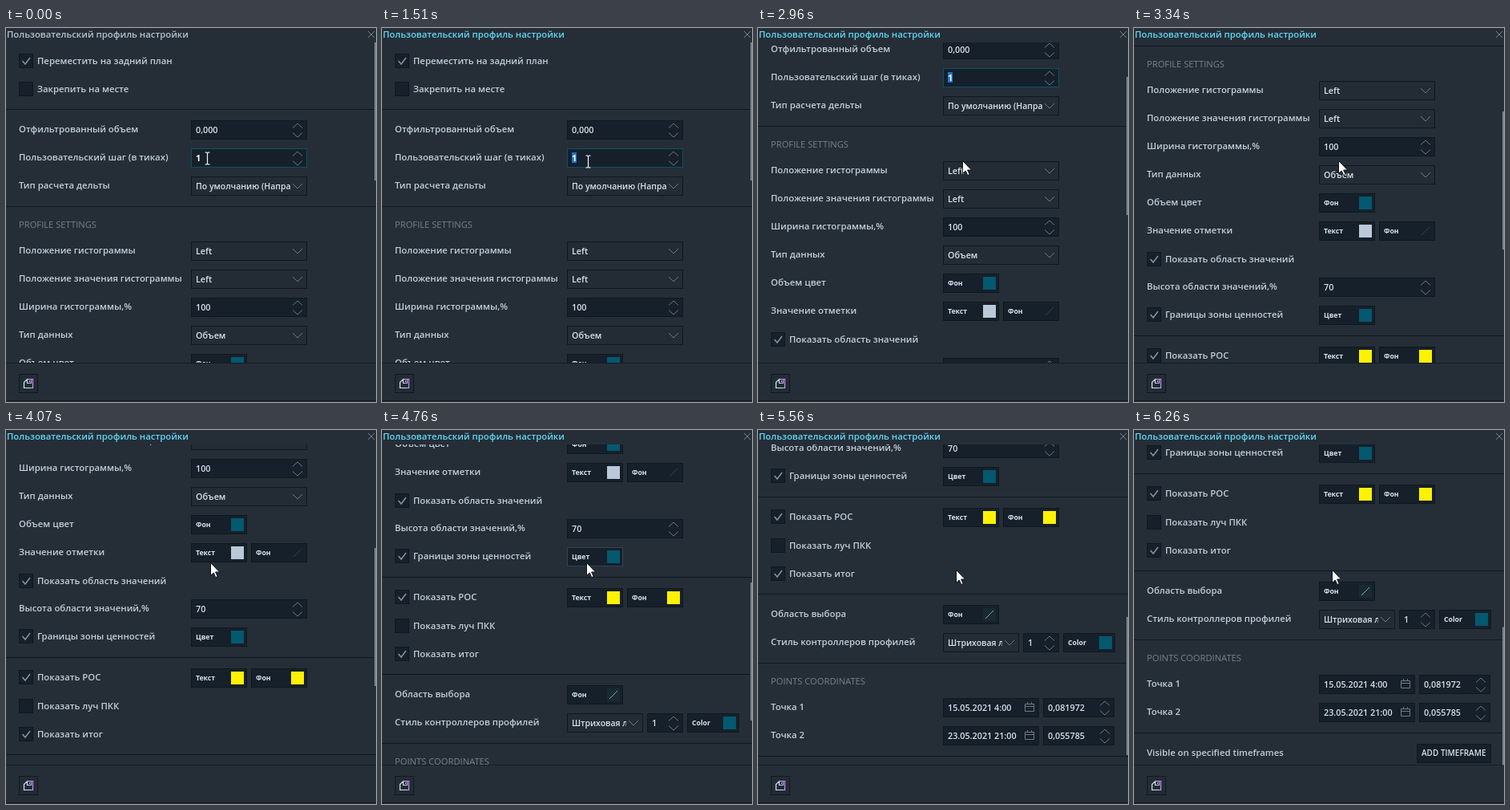
An HTML page that plays this animation: 462 by 466 pixels, repeating every 8.33 s.

```html
<!DOCTYPE html>
<html lang="ru">
<head>
<meta charset="utf-8">
<style>
html, body { margin: 0; width: 100%; height: 100%; overflow: hidden; background: #252e37; }
svg { display: block; }
text { font: 600 11.35px "Open Sans", "Noto Sans", sans-serif; fill: #c2cfda; white-space: pre; }
.value { font-size: 10.8px; fill: #d8e2ea; }
.small { font-size: 8.7px; font-weight: 700; fill: #d8e2ea; }
.head { font-size: 11.2px; font-weight: 400; fill: #75818c; }
.box { fill: #15202a; stroke: #10171e; }
.flat { fill: #232c35; }
.chev { fill: none; stroke: #6d7983; }
.hover { stroke: #33434f; }
</style>
</head>
<body>
<svg width="462" height="466" viewBox="0 0 462 466">
  <defs>
    <clipPath id="view"><rect y="18" width="462" height="399"/></clipPath>
    <linearGradient id="ink" gradientUnits="userSpaceOnUse" x1="22" y1="446" x2="35" y2="442">
      <stop offset=".3" stop-color="#c4ecee"/><stop offset=".9" stop-color="#cb84ea"/>
    </linearGradient>
  </defs>
  <rect width="462" height="466" fill="#252e37"/>
  <g clip-path="url(#view)"><g id="page"></g></g>
  <path d="M0 417.5H462M0 464.5H462" stroke="#151c23"/>
  <text id="title" x="1" y="12">Пользовательский профиль настройки</text>
  <path d="M452 4l8 8m0-8l-8 8" stroke="#76828c"/>
  <rect id="thumb" x="460" width="2" height="172" fill="#76828c"/>
  <rect class="box flat" x="16.5" y="431.5" width="23" height="23"/>
  <path d="M22.5 448.5V441.5L26.5 437.5H33.5V448.5ZM26.5 437.5V442.5H31.5V437.5M29.5 439V441" fill="none" stroke="url(#ink)" stroke-width="1.2"/>
  <path id="beam" d="M-3 -7.5H-1L0 -6.5 1 -7.5H3M0 -6.5V6.5M-3 7.5H-1L0 6.5 1 7.5H3" fill="none" stroke="#f4f6f8" stroke-width="1.2"/>
  <path id="arrow" d="M.5 .5V16.5L4.2 13 6.8 18.6 9.2 17.5 6.6 12H11.6Z" fill="#fff" stroke="#10151a"/>
</svg>
<script>
const LOOP = 8330;
const $ = id => document.getElementById(id);
const TEAL = '#04586f', YELLOW = '#fff200', PALE = '#bac8d7';
let html = '';
const add = s => html += s;
const text = (x, y, s, cls = '', style = '') =>
  add(`<text x="${x}" y="${y}" class="${cls}" style="${style}">${s}</text>`);
const box = (x, y, w, h = 23, cls = '', id = '') =>
  add(`<rect id="${id}" class="box ${cls}" x="${x + .5}" y="${y + .5}" width="${w}" height="${h}"/>`);
const chev = (x, y, d) => add(`<path class="chev" d="M${x - 6} ${y}l6 ${d}l6 ${-d}"/>`);
const label = (y, s, x = 16) => text(x, y + 4, s);
const rule = y => add(`<path d="M0 ${y + .5}H462" stroke="#11181f"/>`);

function check(y, s, on) {
  box(16, y - 9, 17, 17);
  if (on) add(`<path d="M20.500 ${y}l3.500 4 6-8" fill="none" stroke="#88939d" stroke-width="1.5"/>`);
  label(y, s, 39);
}
function spin(y, s, x = 231, w = 144) {
  box(x, y - 11, w);
  text(x + 6, y + 5, s, 'value');
  chev(x + w - 11, y - 1.5, -5.5);
  chev(x + w - 11, y + 4.5, 5.5);
}
function select(y, s, w = 144, size = 10.8) {
  const id = 'cut' + y;
  box(231, y - 11, w, 23, 'flat');
  add(`<clipPath id="${id}"><rect x="232" y="${y - 11}" width="${w - 21}" height="24"/></clipPath><g clip-path="url(#${id})">`);
  text(237, y + 5, s, 'value', `font-size:${size}px`);
  add('</g>');
  chev(231 + w - 11, y - 2, 6);
}
// A swatch is a fill colour; a slash stands for "no colour".
function color(y, s, fill, x = 231, w = 69, slash = '', id = '') {
  box(x, y - 11, w, 23, '', id);
  text(x + 6, y + 4, s, 'small');
  const sx = x + w - 19;
  if (fill) add(`<rect x="${sx}" y="${y - 7}" width="16" height="16" fill="${fill}"/>`);
  if (slash) add(`<path d="M${sx + 3} ${y + 6}l10-10" stroke="${slash}"/>`);
}
function date(y, s, price) {
  box(231, y - 11, 119);
  text(237, y + 5, s, 'value');
  add(`<path class="chev" d="M333.500 ${y - 3.5}h11v9h-11zM333.500 ${y - .5}h11M336.500 ${y - 6}v3M341.500 ${y - 6}v3"/>`);
  spin(y, price, 356, 88);
}

check(41, 'Переместить на задний план', true);
check(76, 'Закрепить на месте');
rule(101);
label(126, 'Отфильтрованный объем'); spin(126, '0,000');
label(161, 'Пользовательский шаг (в тиках)'); spin(161, '');
add('<rect x="231.5" y="150.5" width="144" height="23" fill="none" stroke="#0c5068"/>');
add('<rect id="mark" x="237" y="155" width="6" height="13" fill="#1f72d2"/>');
text(237, 166, '1', 'value', 'font-weight:700;fill:#fff');
add('<rect id="caret" x="243" y="156" width="1" height="12" fill="#e8eef2"/>');
label(196, 'Тип расчета дельты'); select(196, 'По умолчанию (Направление)', 144, 10.5);
rule(222);
text(16, 249, 'PROFILE SETTINGS', 'head');
label(277, 'Положение гистограммы'); select(277, 'Left');
label(312, 'Положение значения гистограммы'); select(312, 'Left');
label(347, 'Ширина гистограммы,%'); spin(347, '100');
label(382, 'Тип данных'); select(382, 'Объем');
label(417, 'Объем цвет'); color(417, 'Фон', TEAL);
label(452, 'Значение отметки'); color(452, 'Текст', PALE); color(452, 'Фон', '', 306, 69, '#33404a');
check(488, 'Показать область значений', true);
label(522, 'Высота области значений,%'); spin(522, '70');
check(557, 'Границы зоны ценностей', true); color(557, 'Цвет', TEAL, 231, 69, '', 'hot');
rule(583);
check(608, 'Показать POC', true); color(608, 'Текст', YELLOW); color(608, 'Фон', YELLOW, 306);
check(644, 'Показать луч ПКК');
check(679, 'Показать итог', true);
rule(704);
label(729, 'Область выбора'); color(729, 'Фон', '#192a33', 231, 69, '#7fa5a8');
label(764, 'Стиль контроллеров профилей');
select(764, 'Штриховая линия', 94, 10.5); spin(764, '1', 331, 44); color(764, 'Color', TEAL, 381, 64);
rule(790);
text(16, 817, 'POINTS COORDINATES', 'head');
label(845, 'Точка 1'); date(845, '15.05.2021 4:00', '0,081972');
label(880, 'Точка 2'); date(880, '23.05.2021 21:00', '0,055785');
rule(906);
label(931, 'Visible on specified timeframes');
box(353, 920, 92);
text(359, 935, 'ADD TIMEFRAME', 'value', 'font-size:10px');
$('page').innerHTML = html;

// Each track lists [start time, value...]; values hold until the next entry.
const scrolls = [[0, 0], [2500, 100], [3280, 200], [3990, 300], [4760, 400], [5560, 500], [6180, 529]];
const pointer = [[0, 251, 162], [360, 250, 161], [510, 252, 163], [580, 255, 165], [650, 257, 166],
  [2960, 255, 165], [5170, 254, 166], [5240, 252, 168], [5320, 249, 171], [5390, 247, 174]];
const at = (track, t) => track.findLast(k => k[0] <= t);
const show = (id, on) => $(id).setAttribute('visibility', on ? 'visible' : 'hidden');

function draw(now) {
  const t = now % LOOP;
  const scroll = at(scrolls, t)[1];
  const [, x, y] = at(pointer, t);
  $('page').setAttribute('transform', `translate(0 ${-scroll})`);
  $('thumb').setAttribute('y', 18 + scroll * .43);
  $('title').style.fill = t < 1510 ? '#b6c4d0' : '#62d8f4';
  $('beam').setAttribute('transform', `translate(${x + .5} ${y + .5})`);
  $('arrow').setAttribute('transform', `translate(${x} ${y})`);
  show('beam', t < 2960);
  show('arrow', t >= 2960);
  show('mark', t >= 1510);
  show('caret', t >= 360 && t < 650 || t >= 1340 && t < 1510);
  $('hot').classList.toggle('hover', t >= 4760 && t < 5320);
  requestAnimationFrame(draw);
}
requestAnimationFrame(draw);
</script>
</body>
</html>
```
